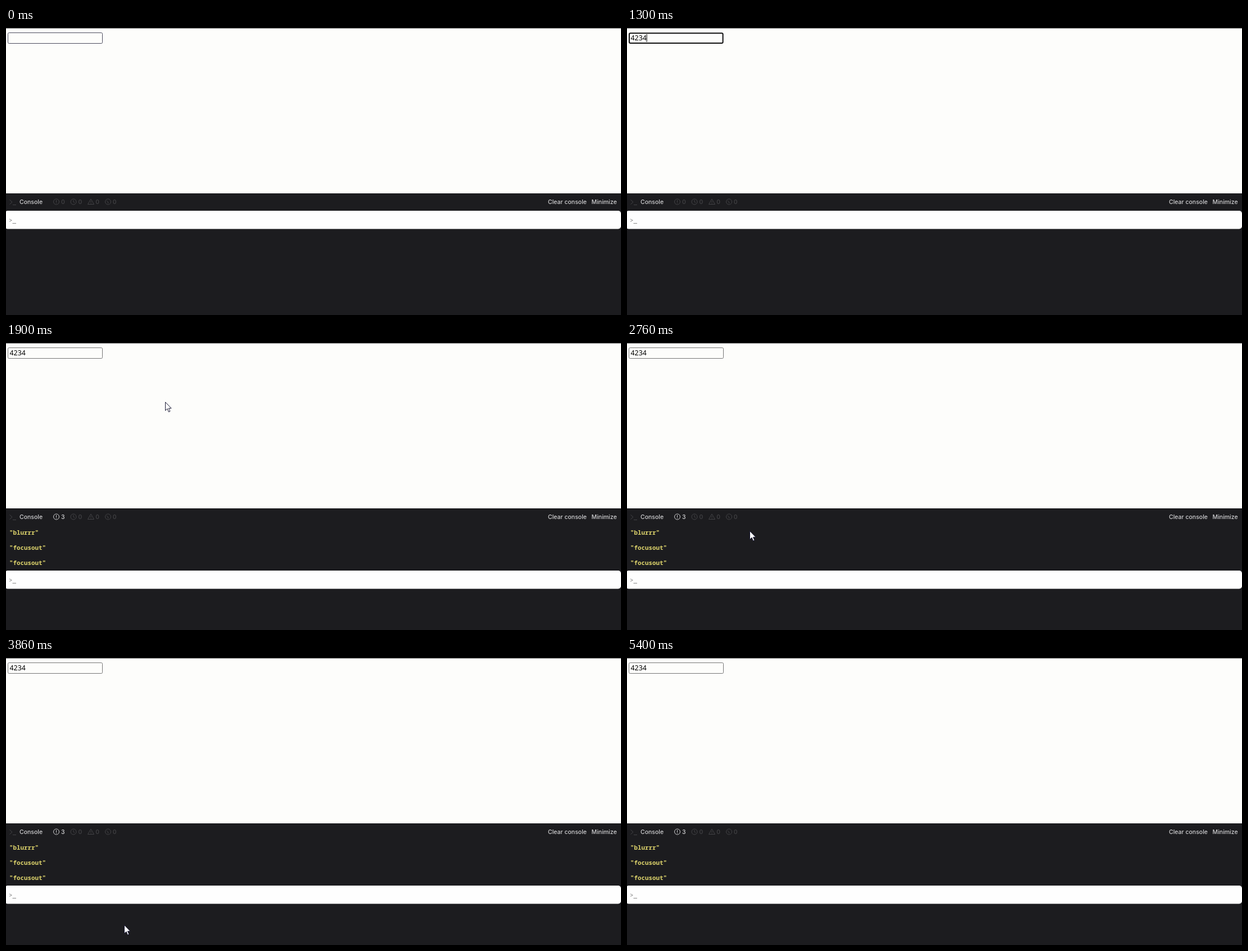
Write an HTML page that moves like this. It is 1094 px wide and 512 px high and loops after 6.06 s.

```html
<!DOCTYPE html>
<html lang="en">
<head>
<meta charset="utf-8">
<title>Console events</title>
<style>
  html, body { margin: 0; width: 100%; height: 100%; overflow: hidden; background: #1c1c1f; }
  svg { display: block; width: 100%; height: 100%; }
  text { white-space: pre; }
  .ui { font: 500 10.5px Inter, sans-serif; fill: #d0d0d2; }
  .field { font: 12.4px "Noto Sans", sans-serif; fill: #000; }
  .log { font: 600 10.83px "Noto Sans Mono", monospace; fill: #dfd56c; }
  .mark { font: 10.83px "Noto Sans Mono", monospace; fill: #777; }
  .icon { fill: none; stroke: currentColor; stroke-width: 1; }
  .badge text { fill: currentColor; }
</style>
</head>
<body>
<svg viewBox="0 0 1094 512">
  <rect width="1094" height="512" fill="#1c1c1f"/>
  <rect width="1094" height="295" fill="#fdfdfb"/>
  <rect width="1094" height="1" fill="#6a6a6a"/>

  <rect id="box" fill="#fdfdfb"/>
  <text id="value" class="field" x="6.5" y="22.4"></text>
  <rect id="caret" y="11" width="1" height="14" fill="#000"/>

  <path class="icon" d="M6.5 306.5l4.5 4-4.5 4M12 315.5h6" color="#434346"/>
  <text class="ui" x="24" y="314.3">Console</text>
  <g id="badges"></g>
  <text class="ui" x="964" y="314.3">Clear console</text>
  <text class="ui" x="1041.6" y="314.3">Minimize</text>

  <g id="logs">
    <text class="log" x="6" y="342">"blurrr"</text>
    <text class="log" x="6" y="369">"focusout"</text>
    <text class="log" x="6" y="395.7">"focusout"</text>
  </g>
  <g id="prompt">
    <rect x="-2" y="326" width="1096" height="32.4" rx="5" fill="#fefefe"/>
    <text class="mark" x="5" y="347">&gt;_</text>
  </g>
  <path id="pointer" d="M.5 .5V15.5L4 12.2L6.4 18L8.8 17L6.4 11.4H11Z"
        fill="#fff" stroke="#1b1b35" stroke-width="1"/>
</svg>
<script>
const LOOP = 6060, STEP = 100 / 3;
const FOCUS = 170, TYPE = 1100, KEY_GAP = 66, BLUR = 1860, LOG = 1900;
const BLINK = 530, POINTER_IN = 1440, POINTER_OUT = 5330;
const $ = id => document.getElementById(id);
const attrs = (el, values) => {
  for (const key in values) el.setAttribute(key, values[key]);
};
const show = (el, on) => attrs(el, { visibility: on ? "visible" : "hidden" });

const ease = {
  line: p => p,
  in: p => p * p,
  out: p => 1 - (1 - p) ** 2,
  both: p => p * p * (3 - 2 * p)
};

// Pointer stops: time, x, y, easing of the way there
const stops = [
  [1430, 100, 16, "line"],
  [1620, 280, 108, "both"],
  [1700, 283, 105, "out"],
  [2500, 283, 105, "line"],
  [2760, 218, 335, "in"],
  [3100, 84.5, 378, "out"],
  [3400, 84.5, 378, "line"],
  [3860, 210, 476, "in"],
  [4000, 262, 496, "out"],
  [4030, 262, 496, "line"],
  [4230, 685, 70, "both"]
];

function pointerAt(t) {
  const i = stops.findIndex(s => s[0] > t);
  if (i < 0) return stops[stops.length - 1].slice(1, 3);
  if (i === 0) return stops[0].slice(1, 3);
  const [t0, x0, y0] = stops[i - 1], [t1, x1, y1, kind] = stops[i];
  const stepped = Math.floor((t - t0) / STEP) * STEP;
  const p = ease[kind](stepped / (t1 - t0));
  return [x0 + (x1 - x0) * p, y0 + (y1 - y0) * p];
}

const circle = x => `<circle class="icon" cx="${x}" cy="310" r="5"/>`;
const shapes = [
  circle(89.5) + '<path class="icon" d="M89.5 307v4M89.5 312v1"/>',
  circle(120) + '<path class="icon" d="M120 307v3l2 2"/>',
  '<path class="icon" d="M151 305l5.5 9.5h-11zM151 308.5v3M151 312.5v1"/>',
  circle(181.5) + '<path class="icon" d="M179 308l2.5 2.5V313"/>'
];
$("badges").innerHTML = shapes.map((shape, i) =>
  `<g class="badge" color="#434346">${shape}<text class="ui" x="${98 + i * 30.6}" y="314.3">0</text></g>`
).join("");
const infoBadge = $("badges").firstElementChild;
const infoCount = infoBadge.querySelector("text");

function draw(t) {
  const focused = t >= FOCUS && t < BLUR;
  const typed = Math.max(0, Math.min(4, Math.floor((t - TYPE) / KEY_GAP) + 1));
  const logged = t >= LOG;

  attrs($("box"), focused
    ? { x: 4, y: 9.3, width: 166.6, height: 17.6, rx: 2, stroke: "#101010", "stroke-width": 2 }
    : { x: 3.5, y: 8.5, width: 168, height: 19, rx: 2, stroke: t < FOCUS ? "#4a4a5c" : "#767676", "stroke-width": 1 });
  $("value").textContent = "4234".slice(0, typed);

  const lastKey = typed ? TYPE + (typed - 1) * KEY_GAP : FOCUS;
  show($("caret"), focused && Math.floor((t - lastKey) / BLINK) % 2 === 0);
  attrs($("caret"), { x: 6.5 + typed * 7.05 });

  show($("logs"), logged);
  attrs($("prompt"), { transform: `translate(0 ${logged ? 80 : 0})` });
  attrs(infoBadge, { color: logged ? "#d0d0d2" : "#434346" });
  infoCount.textContent = logged ? 3 : 0;

  show($("pointer"), t >= POINTER_IN && t < POINTER_OUT);
  attrs($("pointer"), { transform: `translate(${pointerAt(t).join(" ")})` });
}

const start = performance.now();
function tick(now) {
  draw(Math.max(0, now - start) % LOOP);
  requestAnimationFrame(tick);
}
draw(0);
requestAnimationFrame(tick);
</script>
</body>
</html>
```
